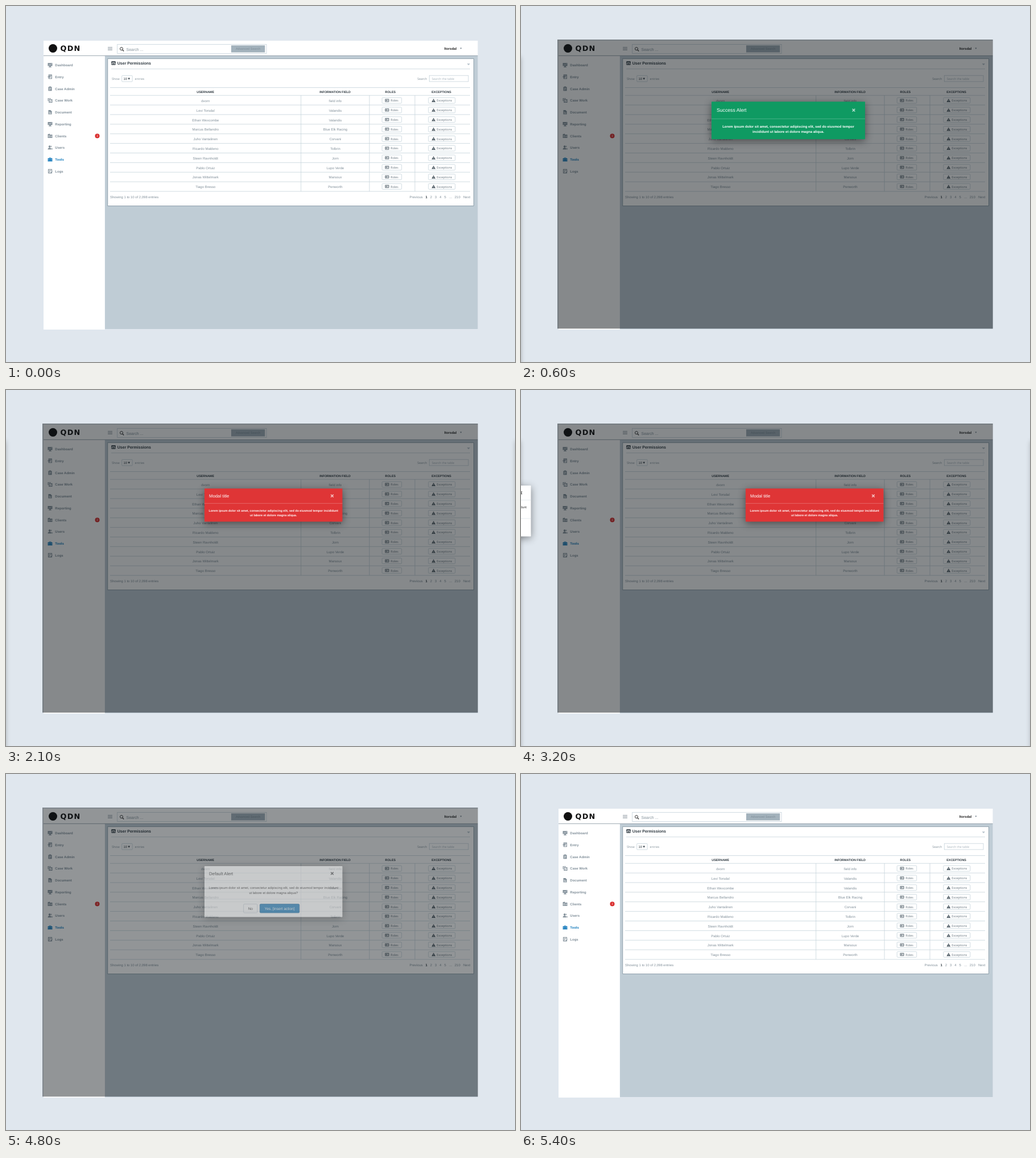
Write an HTML page that moves like this. It is 895x626 px and loops after 6000 ms.

```html
<!DOCTYPE html>
<html lang="en">
<head>
<meta charset="utf-8">
<title>Alert modals</title>
<style>
html, body { margin: 0; width: 100%; height: 100%; overflow: hidden; background: #e0e7ee; }
svg { display: block; width: 895px; height: 626px; font-family: "Liberation Sans", Arial, sans-serif; text-rendering: geometricPrecision; }
.open { font-family: "Open Sans", sans-serif; }
.wide { font-family: "DejaVu Sans", sans-serif; letter-spacing: 1.3px; }
.modal { filter: drop-shadow(0 3px 7px rgba(0,0,0,.45)); }
</style>
</head>
<body>
<svg id="stage" viewBox="0 0 895 626"></svg>
<script>
const GREY = '#82909a', LINE = '#c6d3db', DARK = '#2b363e', BLUE = '#1a7dbd';

// y is the vertical centre of the capitals
const text = (x, y, s, size, fill = GREY, more = '') =>
  `<text x="${x}" y="${y + size * .36}" font-size="${size}" fill="${fill}" ${more}>${s}</text>`;
const MID = 'text-anchor="middle"', BOLD = 'font-weight="700"', OPEN = 'class="open"';
const rect = (x, y, w, h, fill, more = '') =>
  `<rect x="${x}" y="${y}" width="${w}" height="${h}" fill="${fill}" ${more}/>`;
const outline = (x, y, w, h, color, fill = '#fff', r = 0) =>
  rect(x, y, w, h, fill, `stroke="${color}" stroke-width=".8" rx="${r}"`);
const path = (d, fill, more = '') => `<path d="${d}" fill="${fill}" ${more}/>`;
const stroke = (d, color, w = .8) => path(d, 'none', `stroke="${color}" stroke-width="${w}"`);
const at = (x, y, s) => `<g transform="translate(${x} ${y})">${s}</g>`;

// Icons are drawn around 0,0 in a box of 8 by 8
const icons = {
  board: c => path('M-4-3.5h8v5.2h-8zM-1.5 2h3v1.2h1v.8h-5v-.8h1z', c) + stroke('M-2.5.4L-.5-1.2l1 1L3-2.3', '#fff', .7),
  entry: c => stroke('M-2.2-3.3h5v6.6h-5z', c, 1.2) + path('M-4-.7h3v-1.5L1.5 0-1 2.2V.7h-3zM-1-3h3v1.4h-3z', c),
  clip: c => path('M-3-3h2v-1h2v1h2v7h-6z', c) + stroke('M-1.6-.8h3.2M-1.6.8h3.2M-1.6 2.3h2', '#fff', .7),
  copies: c => path('M-4-3.6h5.5v1h-4.5v4h-1z', c) + stroke('M-1.6-1.3h5v4.8h-5z', c, 1.2) + stroke('M-.6 1l1 1 2-2.2', c),
  doc: c => path('M-3-3.8h3.8L3-1.5v5.3h-6z', c) + stroke('M-1.7-.2h2M-1.7 1.2h3.4M-1.7 2.5h3.4', '#fff', .7),
  building: c => path('M-4-2.6l3.6-1.2v1.8H4v5.8h-8z', c) + stroke('M-2.6-1.2v4M-1-1.2v4M1.2-.4v3M2.7-.4v3', '#fff', .6),
  people: c => `<circle cx="-.8" cy="-1.8" r="1.8" fill="${c}"/>` + path('M-4 3.4c0-4 6.4-4 6.4 0zM1.4-3.4a1.6 1.6 0 0 1 .6 3zM2.6.6q1.8.6 1.8 2.8H3z', c),
  case: c => path('M-4-1.7h2v-1.6h4v1.6h2v2h-8zM-4 .9h8v2.7h-8zM-1-2.4v.8h2v-.8z', c, 'fill-rule="evenodd"') + rect(-.7, .1, 1.4, 1.3, c),
  log: c => stroke('M-3-3.2h6v6.4h-6z', c, 1.1) + stroke('M-1.7-1.4h3.4M-1.7 0h2.4M-1.7 1.4h1.6M1 2.8L4 .2', c, .9),
  card: c => stroke('M-3.1-2.2h6.2v4.4h-6.2z', c, .9) + rect(-2.2, -1.2, 1.8, 2.3, c) + stroke('M.4-.8h2M.4.6h2', c, .7),
  warn: c => path('M0-3L3.4 2.9h-6.8z', c) + stroke('M0-1v2M0 1.6v.7', '#fff', .7),
};
const icon = (name, x, y, c = GREY) => at(x, y, icons[name](c));

function header() {
  return rect(66, 61, 763.5, 26.5, '#fff') + stroke('M66 87.4h763.5', '#7d8e99', .9) +
    `<circle cx="82.5" cy="74.5" r="7.5" fill="#111"/>` +
    text(95.5, 74.2, 'QDN', 12.8, '#111', 'class="wide" font-weight="700"') +
    stroke('M179 72.7h8M179 75h8M179 77.3h8', '#74828c', .8) +
    outline(195.7, 67.4, 262.3, 16, LINE) +
    `<circle cx="203" cy="75.2" r="2.5" fill="none" stroke="#333" stroke-width="1"/>` + stroke('M204.8 77l2.4 2.5', '#333', 1.2) +
    text(211.5, 76.3, 'Search ...', 7) +
    rect(396, 69.2, 59.3, 12.4, '#a3b2bc') + text(425.6, 75.4, 'Advanced Search', 5.5, '#7f8e99', MID) +
    text(770.7, 74.6, 'ltorsdal', 6, '#222', BOLD) + path('M798.4 73.6h3l-1.5 2.4z', '#74828c');
}

function sidebar() {
  const items = [['board', 'Dashboard'], ['entry', 'Entry'], ['clip', 'Case Admin'], ['copies', 'Case Work'], ['doc', 'Document'],
    ['board', 'Reporting'], ['building', 'Clients'], ['people', 'Users'], ['case', 'Tools'], ['log', 'Logs']];
  return rect(66, 87.8, 107.8, 481.2, '#fff') + items.map(([name, label], i) => {
    const y = 104 + 20.75 * i, c = label === 'Tools' ? BLUE : GREY;
    return icon(name, 77.5, y - .3, c) + text(86.3, y, label, 6, c, BOLD);
  }).join('') + `<circle cx="160.5" cy="228.4" r="4" fill="#d92b2b"/>` + text(160.5, 228.4, '3', 5, '#fff', MID);
}

function table() {
  const rows = [['dvorn', 'field info'], ['Levi Torsdal', 'Valandis'], ['Ethan Wexcombe', 'Valandis'],
    ['Marcus Bellandro', 'Blue Elk Racing'], ['Juho Vantalinen', 'Corvani'], ['Ricardo Maldeno', 'Tolbrin'],
    ['Steen Ravnholdt', 'Jorn'], ['Pablo Ortuiz', 'Lupo Verde'], ['Jonas Wittelmark', 'Marsoux'], ['Tiago Bresso', 'Penworth']];
  const heads = [[350.7, 'USERNAME'], [578.6, 'INFORMATION FIELD'], [675.8, 'ROLES'], [765.6, 'EXCEPTIONS']];
  let s = stroke('M183 143.5h633M518.7 157v169M639 157v169M719 157v169', LINE);
  s += heads.map(([x, h]) => text(x, 151.5, h, 5.4, DARK, `${MID} ${BOLD}`)).join('');
  for (let i = 0; i <= 10; i++) s += stroke(`M183 ${157.2 + 16.88 * i}h633`, LINE);
  rows.forEach(([user, info], i) => {
    const y = 166.8 + 16.8 * i, b = 166.1 + 16.8 * i;
    s += text(350.8, y, user, 6, GREY, MID) + text(579, y, info, 6, GREY, MID) +
      outline(661.2, b - 5, 34.5, 10, LINE, '#fff', 1.5) + icon('card', 670, b, '#5d6b75') + text(676.3, b + .3, 'Roles', 5.4, '#65737d', OPEN) +
      outline(742.8, b - 5, 47, 10, LINE, '#fff', 1.5) + icon('warn', 751.8, b, '#4d5a63') + text(757.3, b + .3, 'Exceptions', 5.4, '#65737d', OPEN);
  });
  return s;
}

function panel() {
  const pages = [[747.3, 2], [755.6, 3], [764, 4], [772.2, 5], [781.8, '...'], [793.8, 210], [810.2, 'Next'], [721.2, 'Previous']];
  return rect(173.8, 87.8, 655.7, 480.2, '#bfccd5') + outline(178.8, 92.7, 643.6, 258.7, '#7f929e') +
    stroke('M185.8 98h6.4v5.2h-6.4z', DARK, 1) + rect(185.4, 97.6, 7.2, 1.8, DARK) + stroke('M187 101.6h4', DARK, 1.6) +
    text(195.8, 100.8, 'User Permissions', 7, DARK, BOLD) + path('M810.6 101.2h5.4l-2.7 3z', '#b4c1ca') +
    stroke('M185 110.7h631', LINE) +
    text(186, 128, 'Show', 5.4, GREY, OPEN) + outline(203.7, 122.3, 18.5, 10.7, LINE, '#fff', 1) +
    text(206.6, 128, '10', 5.8, DARK) + path('M214.4 126.5h3.6l-1.8 3.3z', DARK) + text(226.6, 128, 'entries', 5.2, GREY, OPEN) +
    text(723.3, 128, 'Search', 5.4, GREY, OPEN) + outline(744.3, 122.2, 68.7, 10.7, LINE) +
    text(748.7, 128, 'Search the table', 5.25, '#a5b1ba', OPEN) + table() +
    text(183, 335.7, 'Showing 1 to 10 of 2,098 entries', 5.95) +
    pages.map(([x, p]) => text(x, 335.7, p, 6, GREY, MID)).join('') + text(739.2, 335.7, 1, 6, DARK, `${MID} ${BOLD}`);
}

const lorem = 'Lorem ipsum dolor sit amet, consectetur adipiscing elit, sed do eiusmod tempor';
const cross = (x, y, c) => stroke(`M${x - 2.3} ${y - 2.3}l4.6 4.6m0-4.6l-4.6 4.6`, c, 1.5);

function modal(id, box, fill, ink, title, lines, ys, sizes, more = '') {
  const [x, y, w, h] = box, [titleY, ruleY, y1, y2] = ys, weight = ink === '#fff' ? BOLD : '';
  const faint = ink === '#fff' ? '#ffffff55' : '#dde5ea', mark = ink === '#fff' ? '#ffffffb0' : '#555';
  return `<g id="${id}" class="modal">` + rect(x, y, w, h, fill, 'rx=".8"') + stroke(`M${x} ${ruleY}h${w}`, faint, .7) +
    text(x + 8 * w / 242.5, titleY, title, sizes[0], ink) + cross(x + w - 18 * w / 242.5, titleY, mark) +
    lines.map((s, i) => text(x + w / 2, i ? y2 : y1, s, sizes[1], ink, `${MID} ${weight}`)).join('') + more + '</g>';
}

const buttons = stroke('M349 226h242.5', '#dde5ea', .7) +
  outline(417.7, 234.7, 24.2, 15.4, '#bfccd5', '#fff', 1.5) + text(429.8, 242.4, 'No', 6.5, '#333', MID) +
  outline(446.4, 234.7, 69.4, 15.4, '#12649b', BLUE, 1.5) + text(481.1, 242.4, 'Yes, [insert action]', 6.5, '#fff', MID);

const edge = (id, x) => rect(x, 90, 24, 620, '#222', `id="${id}" style="filter:blur(4.5px)"`);

const stage = document.getElementById('stage');
stage.innerHTML = header() + panel() + sidebar() +
  rect(64, 59, 765.7, 508.3, 'rgb(15,21,25)', 'id="shade"') + edge('left', -25) + edge('right', 896) +
  modal('success', [335, 168.3, 270, 66], '#0f9a62', '#fff', 'Success Alert',
    [lorem, 'incididunt ut labore et dolore magna aliqua.'], [183.2, 198.3, 211.7, 221.3], [8.7, 6.08]) +
  modal('danger', [349, 173.2, 242.5, 58.4], '#df3536', '#fff', 'Modal title',
    [lorem + ' incididunt', 'ut labore et dolore magna aliqua.'], [186.2, 199.4, 211.7, 220.3], [7.75, 5.27]) +
  modal('normal', [349, 168, 242.5, 89.6], '#fff', '#333', 'Default Alert',
    [lorem + ' incididunt', 'ut labore et dolore magna aliqua?'], [180.8, 193.6, 206.4, 215], [7.75, 5.76], buttons);

const clamp = v => Math.max(0, Math.min(1, v));
const ramp = (t, start, length) => clamp((t - start) / length);
const ease = p => p * p * (3 - 2 * p);

function pose(id, x, y, opacity) {
  const node = document.getElementById(id);
  node.setAttribute('transform', `translate(${x} ${y})`);
  node.style.opacity = opacity;
}

function draw(now) {
  const t = Math.floor(now % 6000 / 100) * 100;   // ten pictures a second
  const enter = ease(ramp(t, 200, 400));
  const slide1 = ease(ramp(t, 1500, 600)), slide2 = ease(ramp(t, 3100, 600));
  const leave = ramp(t, 4700, 700), gone = ramp(t, 4700, 200);
  pose('shade', 0, 0, .5 * ramp(t, 0, 500) * (1 - leave ** 1.2));
  pose('success', 620 * slide1, -16 * (1 - enter), slide1 < 1 ? enter : 0);
  pose('danger', 620 * (slide1 + slide2 - 1), 0, slide1 > 0 && slide2 < 1 ? 1 : 0);
  pose('normal', 620 * (slide2 - 1), -12 * gone, slide2 > 0 ? 1 - gone : 0);
  pose('left', 0, 0, .35 * enter * (1 - slide2));
  pose('right', 0, 0, .3 * slide1 * (1 - slide2));
  requestAnimationFrame(() => draw(performance.now() - begin));
}
const begin = performance.now();
draw(0);
</script>
</body>
</html>
```
